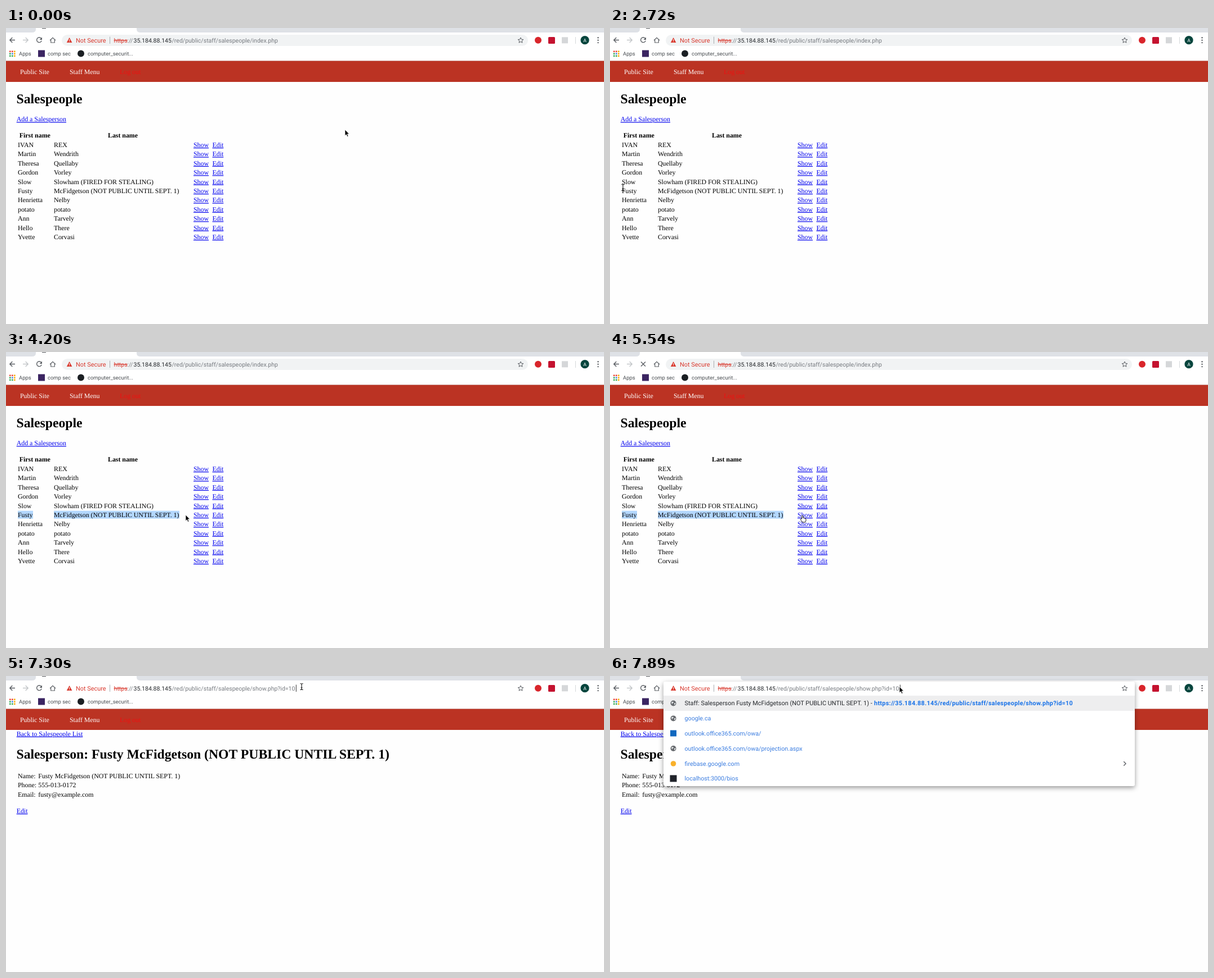
An HTML page that plays this animation: 1062x527 px, repeating every 8000 ms.

```html
<!DOCTYPE html>
<html lang="en">
<head>
<meta charset="utf-8">
<title>Salespeople</title>
<style>
html, body { margin: 0; height: 100%; overflow: hidden; background: #fefefe; }
svg { display: block; width: 100vw; height: 100vh; }
text { font: 11.87px "Liberation Serif", "Times New Roman", serif; text-rendering: geometricPrecision; white-space: pre; }
.h1 { font-size: 23.7px; font-weight: 700; }
.b { font-weight: 700; }
.a { fill: #00e; text-decoration: underline; }
.w { fill: #fff; }
.out { fill: #f01010; }
.ui { font: 10.53px Roboto, Arial, sans-serif; fill: #777b80; }
.mark { font-size: 9.45px; fill: #4a4e52; }
.warn { fill: #d93a2f; }
.secure { font-size: 10.9px; }
.strike { text-decoration: line-through; }
.dark { fill: #25282c; }
.row { font-size: 10.73px; }
.title { font-size: 10.93px; }
.blue { fill: #3b7de0; }
.url { font-size: 10.9px; font-weight: 700; letter-spacing: .28px; fill: #1a73e8; }
.line { fill: none; stroke: #5a5e63; stroke-width: 1.4; }
</style>
</head>
<body>
<svg id="stage" viewBox="0 0 1062 527" preserveAspectRatio="none"></svg>
<script>
const text = (x, y, s, cls = "", extra = "") => `<text x="${x}" y="${y}" class="${cls}" ${extra}>${s}</text>`;
const rect = (x, y, w, h, fill, extra = "") => `<rect x="${x}" y="${y}" width="${w}" height="${h}" fill="${fill}" ${extra}/>`;
const dot = (x, y, r, fill) => `<circle cx="${x}" cy="${y}" r="${r}" fill="${fill}"/>`;
const line = (d, extra = "") => `<path class="line" d="${d}" ${extra}/>`;
const group = (id, ...parts) => `<g id="${id}">${parts.join("")}</g>`;

const note = "(NOT PUBLIC UNTIL SEPT. 1)";
const person = "Fusty McFidgetson " + note;
const people = [
  ["IVAN", "REX"], ["Martin", "Wendrith"], ["Theresa", "Quellaby"], ["Gordon", "Vorley"],
  ["Slow", "Slowham (FIRED FOR STEALING)"], ["Fusty", "McFidgetson " + note],
  ["Henrietta", "Nelby"], ["potato", "potato"], ["Ann", "Tarvely"], ["Hello", "There"],
  ["Yvette", "Corvasi"]
];
const base = "/red/public/staff/salespeople/";

const appColors = ["#ea4335", "#ea4335", "#f9ab00", "#34a853", "#4285f4", "#f9ab00", "#34a853", "#34a853", "#f9ab00"];
const apps = appColors.map((c, i) => rect(6 + i % 3 * 4, 40.5 + Math.floor(i / 3) * 4, 2.6, 2.6, c)).join("");

const toolbar = group("toolbar",
  rect(0, 0, 1062, 59, "#fff"),
  rect(0, 0, 1062, 8, "#dee1e6"),
  `<path d="M46 8Q53 8 53 2V0H232V2Q232 8 239 8Z" fill="#fff"/>`,
  rect(64, 0, 7, 1, "#55585c", 'id="favicon"'),
  rect(99, 12, 828, 20, "#f1f3f4", 'rx="10" id="pill"'),
  line("M16 21.5H7M11.3 17L6.8 21.5L11.3 26"),
  line("M30 21.5H39M34.7 17L39.2 21.5L34.7 26", 'style="stroke:#c3c6c9"'),
  group("reload", line("M62.4 18.4A4.4 4.4 0 1 0 63.2 22.6"), `<path d="M64 16.5V21H59.5Z" fill="#5a5e63"/>`),
  group("stop", line("M55 17.5L63 25.5M63 17.5L55 25.5")),
  line("M78 22L83 17.3L88 22M79.7 21V26H86.3V21", 'style="stroke-width:1.2"'),
  dot(945, 21.7, 6, "#d9252b"),
  rect(963, 16, 12, 12, "#c4122f", 'rx="1.5"'),
  rect(987, 16.3, 11, 11, "#d5d7d9"),
  rect(1011, 16, 1, 12, "#d5d7d9"),
  dot(1028, 21.7, 7.6, "#06453d"),
  text(1028, 24.8, "A", "ui", 'text-anchor="middle" style="font-size:8.5px;fill:#fff"'),
  ...[17.3, 21.7, 26.1].map(y => dot(1051.5, y, 1.2, "#5a5e63")),
  apps, text(23, 48.6, "Apps", "ui mark"),
  rect(57, 39.5, 12, 12, "#3b2562"), text(74, 48.6, "comp sec", "ui mark"),
  dot(133, 45.4, 6, "#1b1f23"), text(145, 48.6, "computer_securit...", "ui mark"),
  rect(0, 58, 1062, 1, "#d8d0cf"));

const nav = rect(0, 58.6, 1062, 37.4, "#bb3323") +
  text(25, 82, "Public Site", "w") + text(113, 82, "Staff Menu", "w") + text(202, 82, "Log out", "out");

const list = group("list",
  text(18.5, 133.7, "Salespeople", "h1"),
  text(18.7, 166.3, "Add a Salesperson", "a"),
  text(51.3, 195.4, "First name", "b", 'text-anchor="middle"'),
  text(207.5, 195.4, "Last name", "b", 'text-anchor="middle"'),
  rect(21, 282.7, 0, 14, "#b3d7fe", 'id="selFirst"'),
  rect(85, 282.7, 0, 14, "#b3d7fe", 'id="selLast"'),
  ...people.map(([first, last], i) => {
    const y = 212 + i * 16.4;
    return text(21, y, first) + text(85, y, last) + text(333, y, "Show", "a") + text(366.5, y, "Edit", "a");
  }));

const fields = [["Name:", person], ["Phone:", "555-013-0172"], ["Email:", "fusty@example.com"]];
const detail = group("detail",
  text(18.7, 106.8, "Back to Salespeople List", "a"),
  text(18.5, 147, "Salesperson: " + person, "h1"),
  ...fields.map(([k, v], i) => text(21, 182 + i * 16.4, k) + text(57.3, 182 + i * 16.4, v)),
  text(18.7, 244, "Edit", "a"));

const globe = y => dot(112.5, y, 5, "#66696d") +
  `<path d="M109 ${y - 2}l3 -1 1 2 -2 1 -1 2zM114 ${y}l2.5 -1 -.5 3 -2 1z" fill="#e4e6e8"/>`;
const hits = ["google.ca", "outlook.office365.com/owa/", "outlook.office365.com/owa/projection.aspx",
  "firebase.google.com", "localhost:3000/bios"];
const popup = group("popup",
  rect(95, 10, 837, 186, "#fff", 'rx="3" style="filter:drop-shadow(0 3px 4px #0006)"'),
  rect(95, 35, 837, 27, "#eeeeef"),
  text(132.5, 52.3, `Staff: Salesperson ${person} -`, "ui title dark"),
  text(469, 52.3, `https://35.184.88.145${base}show.php?id=10`, "ui url"),
  ...hits.map((s, i) => text(132.5, 79.2 + i * 26.8, s, "ui row blue")),
  globe(48.5), globe(75.4), rect(107, 96.5, 11, 11, "#1068bf"), globe(129),
  dot(112.5, 156, 4.8, "#f9b12b"), rect(106.5, 176.5, 12, 12, "#20232a"),
  line("M912.3 152.3L916 156L912.3 159.7"));

const address = group("address",
  `<path d="M112.6 17L117.4 26H107.8Z" fill="#d93a2f"/>`,
  rect(112.1, 20, 1, 3, "#fff"), rect(112.1, 23.7, 1, 1, "#fff"),
  text(124, 25.5, "Not Secure", "ui warn secure"),
  rect(184, 15.5, 1, 12.5, "#a9acb0"),
  text(191.6, 25.5, "https", "ui warn strike"),
  text(215.4, 25.5, "://", "ui"),
  text(226.5, 25.5, "35.184.88.145", "ui dark"),
  text(294.5, 25.5, "", "ui", 'id="path"'),
  rect(514.8, 15.5, 1, 12.5, "#333", 'id="caret"'),
  line("M914 17L915.4 20.2L918.9 20.5L916.2 22.8L917 26.2L914 24.4L911 26.2L911.8 22.8L909.1 20.5L912.6 20.2Z", 'style="stroke-width:1"'));

const pointers = group("pointer",
  `<path id="arrow" d="M0 0V10.8L2.4 8.5L4.1 12.4L5.9 11.6L4.2 7.8H7.5Z" fill="#000" stroke="#fff" stroke-width=".7"/>`,
  group("beam",
    `<path d="M-2.6 -5.5Q0 -5.5 0 -4V4Q0 5.5 -2.6 5.5M2.6 -5.5Q0 -5.5 0 -4V4Q0 5.5 2.6 5.5M-1.4 1.8H1.4" fill="none" stroke="#111" stroke-width="1.1"/>`),
  `<path id="hand" d="M-2.4 0V-4.6Q-2.3 -6 -1.3 -6T-.2 -4.6V-1.6Q1 -2.4 1.7 -1.2Q3 -1.7 3.4 -.5Q5 -.8 5 .8V2.6Q4.8 4.4 3.8 6H-1.5Q-2.8 3.4 -4.6 1.6Q-4.8 .2 -3.6 .3Z" fill="#fff" stroke="#111" stroke-width="1"/>`);

document.getElementById("stage").innerHTML =
  rect(0, 0, 1062, 527, "#fefefe") + toolbar + nav + list + detail + popup + address + pointers;

// Pointer poses, each held until the next: time, x, y; the shape changes at the times in "shapes".
const poses = [
  [0, 602, 181], [150, 586, 182], [930, 450, 105], [1080, 180, 20], [1230, 2, 4], [1370, 18, 170],
  [1520, 96, 313], [1670, 166, 304], [2120, 145, 303], [2270, 96, 298], [2420, 48, 290], [2570, 27, 285],
  [2720, 23, 284], [2870, 21, 289], [3010, 31, 291], [3160, 44, 291], [3310, 105, 291], [3450, 205, 290],
  [3600, 284, 292], [3750, 309, 295], [4200, 319, 290], [4350, 326, 292], [4500, 334, 296], [4640, 340, 297],
  [4940, 343, 297], [5690, 345, 290], [5830, 392, 220], [5970, 452, 135], [6120, 476, 104], [6420, 480, 74],
  [6570, 489, 58], [6720, 504, 36], [6860, 518, 23], [7010, 525, 19], [7590, 526, 18], [7740, 520, 18],
  [7890, 514, 19]
];
const shapes = [[0, "arrow"], [2420, "beam"], [3750, "arrow"], [4500, "hand"], [5830, "arrow"], [6860, "beam"], [7740, "arrow"]];
const at = (keys, t) => keys.findLast(k => k[0] <= t);

const el = id => document.getElementById(id);
const show = (id, on) => el(id).setAttribute("display", on ? "inline" : "none");

function draw(now) {
  const t = now % 8000;
  const [, x, y] = at(poses, t);
  const shape = at(shapes, t)[1];
  const loading = t >= 5540 && t < 5970;
  const opened = t >= 5830;
  const end = t >= 2870 ? x : 0;

  el("pointer").setAttribute("transform", `translate(${x} ${y})`);
  for (const s of ["arrow", "beam", "hand"]) show(s, s === shape);
  el("selFirst").setAttribute("width", Math.max(0, Math.min(48, end) - 21));
  el("selLast").setAttribute("width", Math.max(0, Math.min(308, end) - 85));
  show("list", !opened);
  show("detail", opened);
  show("reload", !loading);
  show("stop", loading);
  show("favicon", !loading);
  show("pill", t < 7010);
  show("caret", t >= 7300);
  show("popup", t >= 7740);
  el("path").textContent = base + (opened ? "show.php?id=10" : "index.php");
}

const start = performance.now();
function tick() {
  draw(Math.max(0, performance.now() - start));
  requestAnimationFrame(tick);
}
tick();
</script>
</body>
</html>
```
